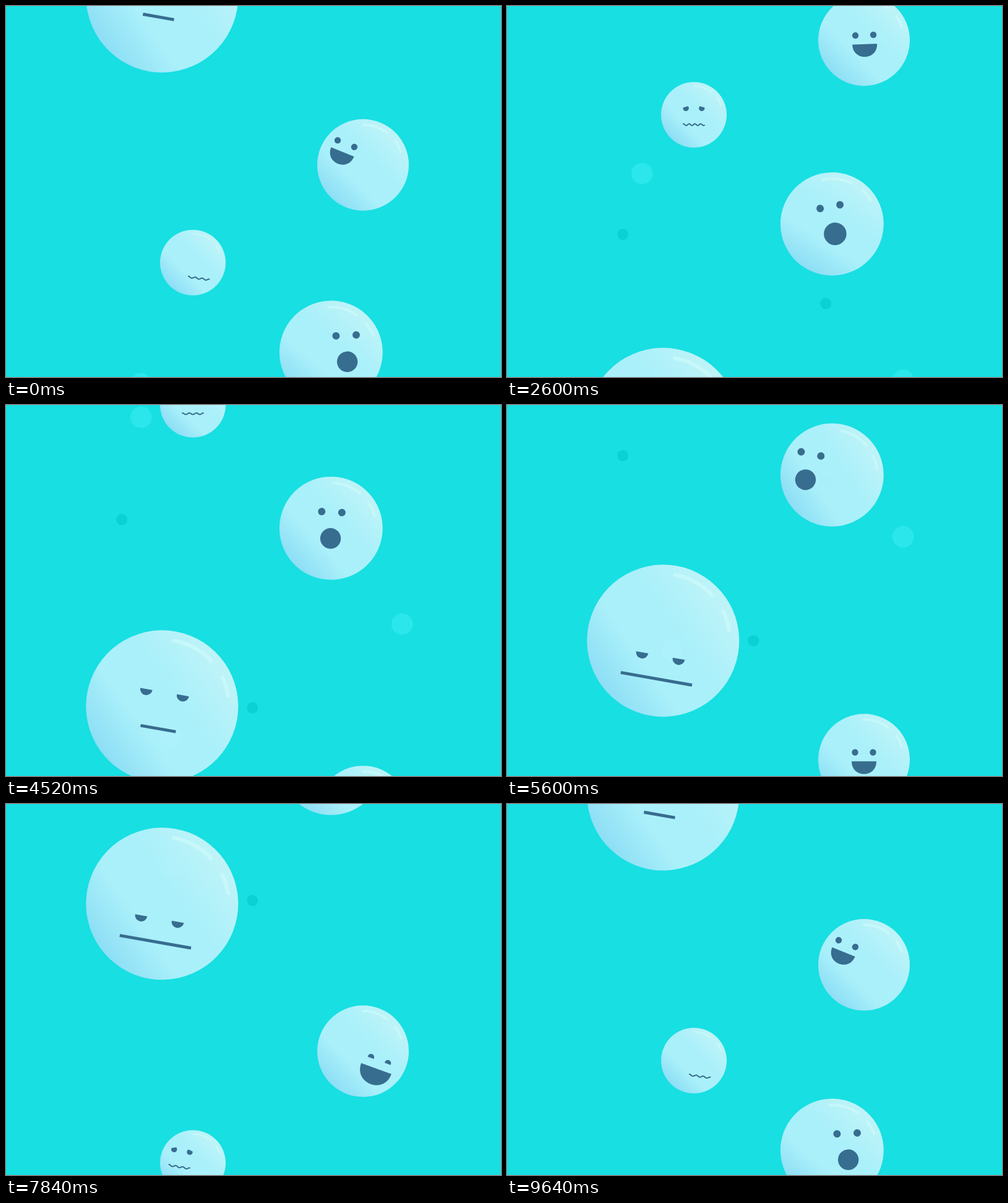
Animation, 800 px wide and 600 px high, one loop 9680 ms. Source, as an HTML page with a canvas:

```html
<!DOCTYPE html>
<html lang="en">
<head>
<meta charset="utf-8">
<title>Bubbles</title>
<style>
  html, body { margin: 0; height: 100%; overflow: hidden; background: #18dfe2; }
  canvas { display: block; }
</style>
</head>
<body>
<canvas id="stage" width="800" height="600"></canvas>
<script>
const ctx = document.getElementById('stage').getContext('2d');
const LOOP = 9680, STEP = 40, INK = '#376d8f', DEG = Math.PI / 180;

// Smooth 0 to 1 while t runs from a to b.
function ease(t, a, b) {
  const u = Math.max(0, Math.min(1, (t - a) / (b - a)));
  return (1 - Math.cos(Math.PI * u)) / 2;
}

// 1 around the moment mid, easing to 0 on both sides; cyclic.
function bump(t, mid, hold = 250, fade = 800) {
  const away = Math.abs((t - mid + LOOP * 1.5) % LOOP - LOOP / 2);
  return 1 - ease(away, hold, hold + fade);
}

// Moves to the face: rests at (0, restY) and glances aside at given moments.
function look(t, restY, glances) {
  let x = 0, y = restY, angle = 0;
  for (const [mid, dx, dy, turn] of glances) {
    const w = bump(t, mid);
    x += w * dx;
    y += w * dy;
    angle += w * turn;
  }
  place(x, y, angle);
}

function place(x, y, angle) {
  ctx.translate(x, y);
  ctx.rotate(angle * DEG);
}

function disc(x, y, r, colour) {
  ctx.fillStyle = colour;
  ctx.beginPath();
  ctx.arc(x, y, r, 0, 2 * Math.PI);
  ctx.fill();
}

// Circle cut by a straight eyelid; lid is its offset below the centre.
function eye(x, y, r, lid = -r, tilt = 0) {
  const a = Math.asin(Math.max(-1, Math.min(1, lid / r)));
  const turn = tilt * DEG;
  ctx.fillStyle = INK;
  ctx.beginPath();
  ctx.arc(x, y, r, a + turn, Math.PI - a + turn);
  ctx.fill();
}

function happy(t) {
  const laugh = bump(t, 7840);
  look(t, 2.6, [
    [0, -33, -23.5, 22], [1720, 15, -34.5, -20], [3440, -3.5, 47, 0],
    [6640, -31, 29.5, -20], [7840, 21.5, 25.5, 20]
  ]);
  for (const side of [-1, 1]) eye(side * 14.5, -14.5, 5.2, -5.2 + 4 * laugh, 180);
  ctx.scale(1 + .3 * laugh, 1 + .3 * laugh);
  ctx.beginPath();
  ctx.moveTo(-20, 0);
  ctx.lineTo(20, 0);
  ctx.bezierCurveTo(20, 13, 11, 20.5, 0, 20.5);
  ctx.bezierCurveTo(-11, 20.5, -20, 13, -20, 0);
  ctx.fill();
}

function worried(t) {
  const shiver = bump(t, 3440), blink = bump(t, 0);
  look(t, 14.5, [[0, 9.5, 11, 8], [3440, 0, 8.5, 0], [7840, -22, -8, 9.5]]);
  for (const side of [-1, 1]) {
    eye(side * 12.8, -26.6, 4.7, -2.8 + 3 * shiver + 7.5 * blink, side * 16);
  }
  const waves = 3 + 4 * shiver, height = 1.2 + shiver;
  ctx.strokeStyle = INK;
  ctx.lineWidth = 2;
  ctx.lineCap = ctx.lineJoin = 'round';
  ctx.beginPath();
  for (let u = 0; u <= 1.001; u += .01) {
    ctx.lineTo(-17 + 34 * u, -height * Math.cos(2 * Math.PI * waves * u));
  }
  ctx.stroke();
}

function gasping(t) {
  const shock = bump(t, 3440);
  look(t, 0, [[0, 25.6, 0, 0], [3440, 12.5, 1.5, 9.3], [5600, -40.3, 0, 0]]);
  for (const side of [-1, 1]) eye(side * 16.3, -26.2 - 13.3 * shock, 6);
  disc(0, 16.5, 16.7 + 9.8 * shock, INK);
}

function bored(t) {
  const up = 1 - bump(t, 6700, 1150, 1300);
  const width = 117 - 66 * up;
  for (const side of [-1, 1]) eye(side * 30, 24.3 - 53 * up, 10, 0);
  ctx.fillRect(-width / 2, 60 - 28.8 * up, width, 5);
}

// Leans slowly left, swings over to the right, then straightens up.
function sway(t) {
  const age = (t + 1548) % 9640;
  return 14 * (2 * ease(age, 5450, 6550) - ease(age, 0, 5450) - ease(age, 6550, 9000));
}

const bubbles = [
  { x: 252.3, y: -15.5, r: 123, speed: .0982, cycle: 9640, tilt: () => 10, face: bored },
  { x: 577, y: 257, r: 74, speed: .0776, cycle: LOOP, tilt: () => 0, face: happy },
  { x: 302, y: 415, r: 53, speed: .0919, cycle: 9640, tilt: () => 0, face: worried },
  { x: 525.3, y: 560, r: 83.4, speed: .0798, cycle: 9640, tilt: sway, face: gasping }
];

for (const b of bubbles) {
  const d = b.r * Math.SQRT1_2;
  b.fill = ctx.createLinearGradient(-d, d, d, -d);
  b.fill.addColorStop(0, 'rgba(154,222,247,.9)');
  b.fill.addColorStop(.32, 'rgba(186,242,253,.9)');
  b.fill.addColorStop(.62, 'rgba(186,242,253,.9)');
  b.fill.addColorStop(1, 'rgba(209,246,250,.9)');
}

function drawBubble(b, t) {
  let y = b.y - b.speed * t;
  if (y < -b.r - 1) y += b.speed * b.cycle;
  ctx.save();
  place(b.x, y, b.tilt(t));
  disc(0, 0, b.r, b.fill);
  ctx.strokeStyle = 'rgba(220,255,250,.4)';
  ctx.lineWidth = b.r * .05;
  ctx.lineCap = 'round';
  for (const [from, to] of [[-90, -53], [-36, -19]]) {
    ctx.beginPath();
    ctx.arc(0, 0, b.r * .878, from * DEG, to * DEG);
    ctx.stroke();
  }
  b.face(t);
  ctx.restore();
}

// Small bubbles: each rises from the bottom edge at its own moment.
function drawDots(t, r, colour, dots) {
  for (const [x, start, speed] of dots) disc(x, 600 + r - speed * (t - start), r, colour);
}

function draw() {
  const t = Math.floor(performance.now() / STEP) * STEP % LOOP;
  ctx.fillStyle = '#18dfe2';
  ctx.fillRect(0, 0, 800, 600);
  drawDots(t, 17.3, '#2be7eb', [[218.3, -48, .1308], [640.2, 2509, .1308], [266, 3908, .1308]]);
  drawDots(t, 9, '#0bd0d4', [[187.2, 98, .0958], [515.3, 1530, .1196], [398.3, 3333, .1005]]);
  for (const b of bubbles) drawBubble(b, t);
  requestAnimationFrame(draw);
}
draw();
</script>
</body>
</html>
```
